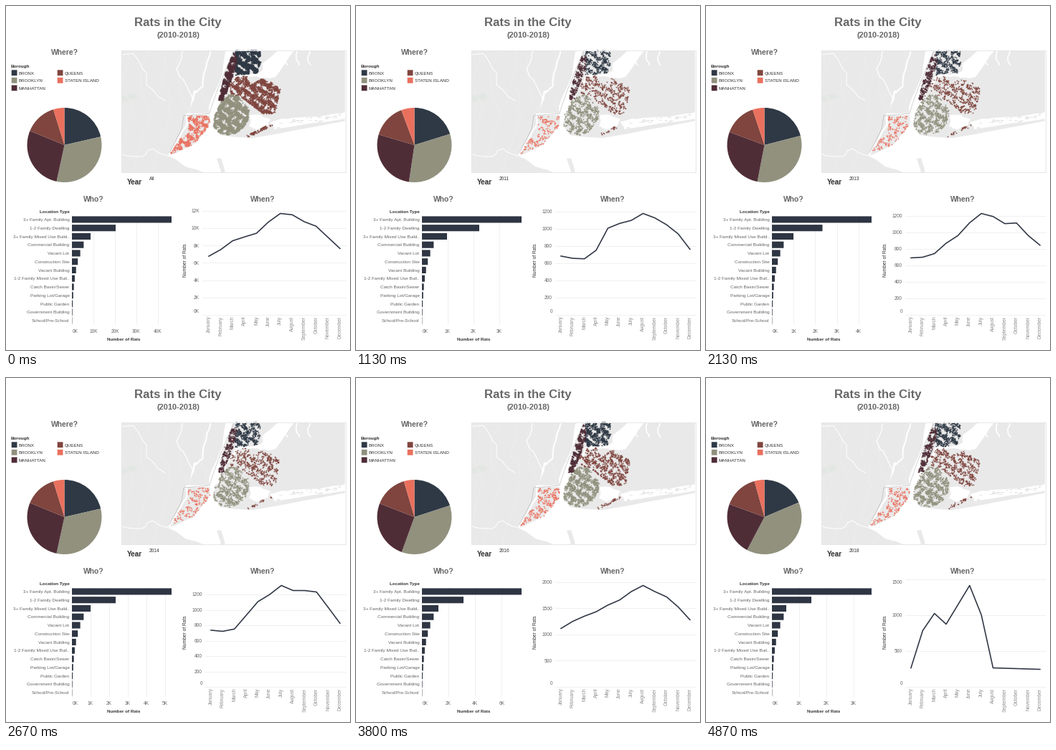
Animation, 480 px wide and 480 px high, one loop 5.34 s. Source, as a matplotlib script:

```python
import numpy as np
import matplotlib.pyplot as plt
from matplotlib.animation import FuncAnimation
from matplotlib.patches import Polygon, Rectangle, Wedge
from matplotlib.path import Path

LOOP, STEP = 5340, 30
PX = 0.9  # points per pixel at 80 dpi
plt.rcParams["font.family"] = "Liberation Sans"

DARK, GRAY, PALE = "#333333", "#666666", "#8c8c8c"
INK, GRID, LAND = "#2e3543", "#f0f0f0", "#e9e9e9"
COLORS = ["#2f3945", "#91917e", "#4f2d37", "#7f453e", "#ea705e"]
BOROUGHS = ["BRONX", "BROOKLYN", "MANHATTAN", "QUEENS", "STATEN ISLAND"]
MONTHS = ("January February March April May June July August "
          "September October November December").split()
PLACES = ["3+ Family Apt. Building", "1-2 Family Dwelling",
          "3+ Family Mixed Use Build..", "Commercial Building", "Vacant Lot",
          "Construction Site", "Vacant Building", "1-2 Family Mixed Use Buil..",
          "Catch Basin/Sewer", "Parking Lot/Garage", "Public Garden",
          "Government Building", "School/Pre-School"]

# Label, longest bar in K, busiest month's count, its index, height in March
YEARS = [("All", 46.3, 11730, 6, 102), ("2010", 3.7, 1145, 6, 74),
         ("2011", 3.86, 1183, 7, 80), ("2012", 3.97, 1173, 8, 81),
         ("2013", 4.6, 1235, 6, 81), ("2014", 5.35, 1321, 6, 82),
         ("2015", 6.78, 1744, 7, 75), ("2016", 7.5, 1945, 7, 100),
         ("2017", 7.94, 1959, 7, 128), ("2018", 3.66, 1420, 5, 103)]
BAR_MAX, LINE_MAX = 139, 142

# Map outlines per borough
REGIONS = [
    [[(320, 62), (354, 62), (355, 78), (350, 93), (320, 96), (318, 86)]],
    [[(300, 132), (310, 124), (322, 124), (339, 143), (337, 160), (329, 172),
      (314, 180), (298, 177), (289, 168), (291, 152)]],
    [[(317, 64), (322, 72), (318, 92), (303, 131), (296, 131), (304, 98)]],
    [[(311, 111), (322, 98), (335, 97), (345, 107), (360, 99), (382, 115),
      (375, 150), (358, 150), (326, 125), (314, 122)],
     [(336, 180), (364, 166), (372, 166), (338, 183)]],
    [[(254, 153), (283, 153), (284, 165), (262, 192), (229, 206), (242, 185),
      (254, 178)]]]
DENSITY = (.75, .75, 1.1, .42, .27)

fig = plt.figure(figsize=(6, 6), dpi=80, facecolor="white")
ax = fig.add_axes([0, 0, 1, 1])
ax.set(xlim=(0, 480), ylim=(480, 0))
ax.axis("off")


def text(x, y, s, size, color=GRAY, ha="left", **kw):
    return ax.text(x, y, s, fontsize=size * PX, color=color, ha=ha,
                   **{"va": "baseline", **kw})


def line(xs, ys, color, width=1, **kw):
    return ax.plot(xs, ys, color=color, lw=width * PX, **kw)[0]


def rect(x, y, w, h, color, **kw):
    return ax.add_patch(Rectangle((x, y), w, h, fc=color, ec="none", **kw))


def rough(points, amount, rng):
    """Subdivide a path with small random offsets, like a coastline."""
    pts = np.array(points, float)
    for _ in range(2):
        mid = (pts[1:] + pts[:-1]) / 2 + rng.normal(0, amount, (len(pts) - 1, 2))
        out = np.empty((len(pts) * 2 - 1, 2))
        out[::2], out[1::2] = pts, mid
        pts, amount = out, amount / 2
    return pts


def draw_basemap():
    rng = np.random.default_rng(4)
    frame = rect(161, 62, 312, 170, LAND, zorder=0)

    def area(points, color="white", amount=.8):
        patch = ax.add_patch(Polygon(rough(points + points[:1], amount, rng),
                                     fc=color, ec="none", zorder=1))
        patch.set_clip_path(frame)

    def stroke(points, width, amount=1.0, color="white", **kw):
        pts = rough(points, amount, rng)
        line(pts[:, 0], pts[:, 1], color, width, zorder=1, **kw).set_clip_path(frame)

    area([(162, 126), (178, 121), (184, 128), (163, 135)], "#e3e7e4")
    for x in range(170, 280, 27):
        stroke([(x, 60), (x - 8, 110), (x + 6, 150), (x - 20, 234)], .7, 5, "#efefef")

    # Hudson, harbour and ocean
    area([(307, 60), (318, 60), (298, 118), (302, 140), (291, 150), (289, 168),
          (298, 180), (345, 184), (475, 160), (475, 234), (280, 234), (250, 224),
          (226, 209), (262, 193), (284, 166), (283, 140), (302, 95)])
    area([(294, 213), (300, 212), (306, 234), (300, 234)], LAND)
    # Sound and bays
    area([(338, 97), (355, 92), (358, 80), (383, 60), (404, 60), (376, 99),
          (354, 100)], amount=1.5)
    area([(340, 152), (356, 152), (369, 158), (365, 167), (350, 173), (339, 168)])
    area([(368, 162), (400, 156), (475, 148), (475, 157), (374, 172)], amount=1.5)
    for _ in range(26):
        x = rng.uniform(376, 470)
        y = 167 - .145 * (x - 372) + rng.uniform(-5, 3)
        rect(x, y, rng.uniform(2, 6), rng.uniform(.8, 2), LAND, zorder=1)
    # Rivers
    area([(255, 151), (262, 118), (267, 118), (262, 131)])
    stroke([(300, 135), (309, 117), (321, 98), (342, 97)], 3)
    stroke([(285, 151), (252, 151), (252, 166), (242, 183), (228, 207)], 2.5)
    stroke([(286, 60), (276, 95), (266, 120)], 2, 2)
    stroke([(247, 60), (238, 88), (250, 108), (262, 131)], 1.2, 2)
    stroke([(160, 68), (188, 82), (196, 110), (222, 132)], 1, 3)
    stroke([(226, 209), (205, 199), (190, 210), (160, 205)], 1, 2)
    for x in (392, 408, 424):
        stroke([(x, 60), (x - 3, 72), (x + 1, 82)], 1.6)
    stroke([(318, 62), (297, 112), (284, 150), (248, 153), (245, 172), (228, 205)],
           .8, .2, "#777777", ls=":")
    ax.add_patch(Rectangle((160.5, 61.5), 313, 170, fc="none", ec="#e6e6e6",
                           lw=PX, zorder=4))


def sightings(shapes, density, rng):
    """Clumpy random points inside the given outlines."""
    found = []
    for shape in shapes:
        lo, hi = np.min(shape, axis=0), np.max(shape, axis=0)
        p = rng.uniform(lo, hi, (int(density * np.prod(hi - lo)), 2))
        x, y = p.T
        clump = (np.sin(.55 * x + 1.5 * np.sin(.4 * y)) + np.sin(.5 * y - .25 * x)
                 + rng.normal(0, .8, len(p)))
        found.append(p[Path(shape).contains_points(p) & (clump > 0)])
    return np.concatenate(found).T


def draw_static():
    text(240, 28, "Rats in the City", 16.8, GRAY, "center", weight="bold")
    text(240, 44, "(2010-2018)", 11, GRAY, "center", weight="bold")
    for x, y, s in ((81.5, 68, "Where?"), (122, 273, "Who?"), (358, 273, "When?")):
        text(x, y, s, 10.3, GRAY, "center", weight="bold")
    text(7, 86, "Borough", 6.4, DARK, weight="bold")
    for i, (name, color) in enumerate(zip(BOROUGHS, COLORS)):
        x, y = 7.7 + 64 * (i // 3), 89.3 + 10.6 * (i % 3)
        rect(x, y, 7.8, 7.8, color, snap=False)
        text(x + 10.3, y + 6.4, name, 6.2, DARK)
    text(168.5, 249, "Year", 10, DARK, weight="bold")
    text(89, 289.3, "Location Type", 6.2, DARK, "right", weight="bold")
    for i, place in enumerate(PLACES):
        text(88.5, 300.2 + 11.75 * i, place, 6.4, GRAY, "right")
    text(164.5, 467, "Number of Rats", 6.3, DARK, "center", weight="bold")
    text(251, 355, "Number of Rats", 6.7, DARK, "center", va="center", rotation=90)
    line([92, 92], [292, 444], "#e2e2e2", .8)


def blend(s, keys, values):
    """Value for scene s; the overview uses the middle of the period."""
    return np.interp(s if s else 5, keys, values)


def pie(s):
    first, middle, last = ((.198, .520, .790, .940), (.214, .534, .812, .952),
                           (.186, .577, .806, .957))
    cuts = [blend(s, (1, 5, 9), v) for v in zip(first, middle, last)]
    edges = [0, *cuts, 1]
    return [ax.add_patch(Wedge((81.5, 194), 52, 360 * a - 90, 360 * b - 90,
                               fc=c, ec="none"))
            for a, b, c in zip(edges, edges[1:], COLORS)]


def dots(s):
    rng = np.random.default_rng(100 + s)
    factor = np.clip(YEARS[s][2] / 1200, 1, 4)
    made = []
    for shapes, density, color in zip(REGIONS, DENSITY, COLORS):
        x, y = sightings(shapes, density * factor, rng)
        made += ax.plot(x, y, "s", ms=1.5 * PX, mew=0, color=color, zorder=3,
                        snap=False)
    return made


def bar_chart(s):
    top = YEARS[s][1]
    value = 10 if top > 10 else 2 if top > 6 else 1
    made = [text(92.5, 455.8, "0K", 6.6)]
    for k in range(value, int(top + .1) + 1, value):
        x = 92 + BAR_MAX * k / top
        made += [line([x, x], [292, 444], GRID, zorder=1),
                 text(x, 455.8, f"{k}K", 6.6, ha="center")]
    second = blend(s, (1, 3, 5, 9), (80, 80, 61, 55))
    third = blend(s, (1, 3, 5, 9), (36, 34, 26, 20))
    tail = 17 * .72 ** np.arange(len(PLACES) - 3) - .6
    return made + [rect(92, 293.4 + 11.75 * i, w, 9.1, INK, zorder=2, snap=False)
                   for i, w in enumerate((BAR_MAX, second, third, *tail))]


def month_heights(s):
    peak, march = YEARS[s][3:]
    if YEARS[s][0] == "2018":  # reports stop in summer
        return np.interp(range(12), (0, 1, 2, 3, 5, 6, 7, 11),
                         (27, 79, march, 88, LINE_MAX, 101, 27, 25))
    season = np.interp(range(12), (0, 2, 4, peak, 9, 11),
                       (82, march, 116, LINE_MAX, 128, 93))
    wobble = np.random.default_rng(s).normal(0, 3, 12)
    wobble[peak] = 0
    return np.minimum(season + wobble, LINE_MAX)


def line_chart(s):
    busiest = YEARS[s][2]
    total = busiest > 10000
    value = 2000 if total else 500 if busiest > 1400 else 200
    left, first = (274, 283) if total else (278, 286)
    made = []
    for v in range(0, int(busiest * 1.06), value):
        y = 431 - LINE_MAX * v / busiest
        made += [line([left, 474], [y, y], GRID, zorder=1),
                 text(left - 4, np.clip(y, 285, 426) + 2.4,
                      f"{v // 1000}K" if total else str(v), 6.6, ha="right")]
    xs = np.linspace(first, 466, 12)
    made.append(line(xs, 431.5 - month_heights(s), INK, 1.6, zorder=2,
                     solid_joinstyle="round"))
    return made + [text(x, 432.5, m, 6.8, PALE, "center", va="top", rotation=90)
                   for x, m in zip(xs, MONTHS)]


draw_basemap()
draw_static()
scenes = [pie(s) + dots(s) + bar_chart(s) + line_chart(s)
          + [text(200, 243.2, YEARS[s][0], 6.6, DARK)] for s in range(len(YEARS))]


def update(i):
    current = int((i + .5) * STEP * len(YEARS) / LOOP)
    for s, scene in enumerate(scenes):
        for artist in scene:
            artist.set_visible(s == current)
    return scenes[current]


anim = FuncAnimation(fig, update, frames=LOOP // STEP, interval=STEP,
                     repeat=True, repeat_delay=0, blit=False)
plt.show()
```
